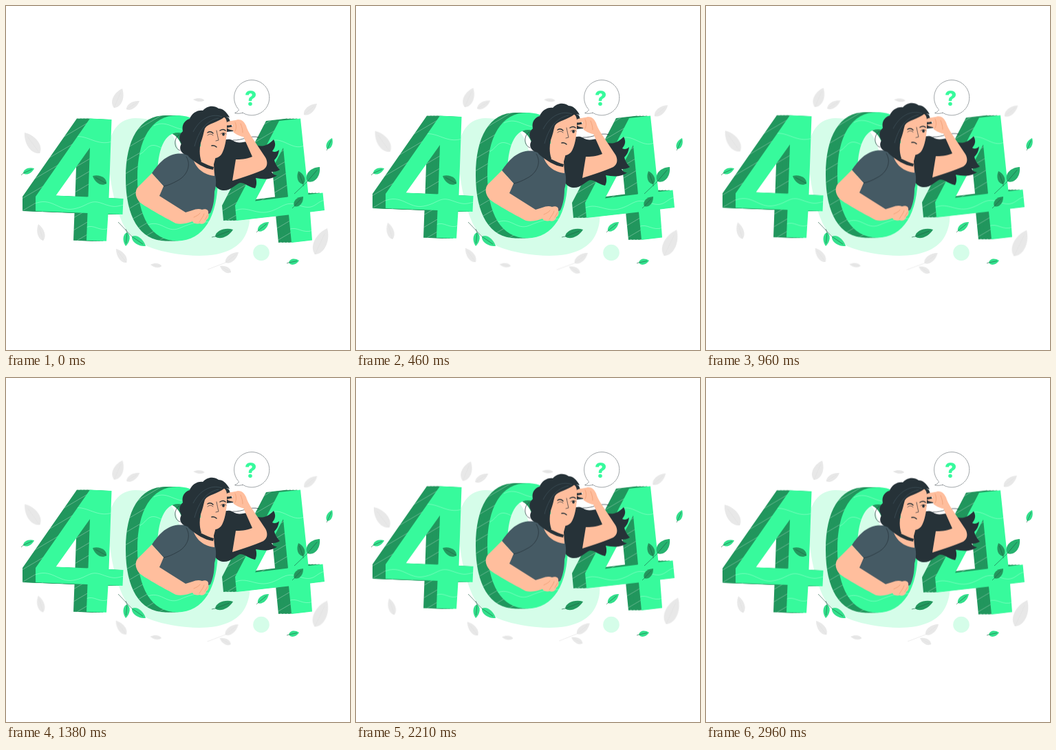
These frames come from a looping animation (500 by 500 pixels, 3 s). An HTML page:

```html
<!DOCTYPE html>
<html lang="en">
<head>
<meta charset="utf-8">
<title>404</title>
<style>
html, body { margin: 0; width: 100%; height: 100%; overflow: hidden; background: #fff; }
svg { display: block; width: 100vw; height: 100vh; }
.float { animation: float 1.5s linear infinite; }
.wind { animation: wind 3s linear infinite; transform-origin: 250px 250px; }
@keyframes float { 50% { transform: translateY(-6.6px); } }
@keyframes wind { 25% { transform: rotate(1deg); } 75% { transform: rotate(-1deg); } }
.face { fill: #37fa9c; }
.side { fill: #21965d; }
.wave { fill: none; stroke: #fff; stroke-width: .6; opacity: .5; }
.skin { fill: #ffbe9d; }
.hair { fill: #263238; }
.shirt { fill: #455a64; }
.ink { fill: none; stroke: #263238; stroke-width: .7; stroke-linecap: round; stroke-linejoin: round; }
.fold { fill: none; stroke: #eb996e; stroke-width: .7; stroke-linecap: round; }
.bubble { fill: #fff; stroke: #263238; stroke-width: .6; stroke-dasharray: 1.5 .5; }
text { font: 800 30px Inter, Arial, sans-serif; fill: #37fa9c; text-anchor: middle; }
</style>
</head>
<body>
<svg viewBox="0 0 500 500">
  <defs>
    <path id="four1" fill-rule="evenodd" clip-rule="evenodd" d="M122 163.500L153.500 165L149.500 279L170.500 280L169.500 303L148.500 302.300L146 341.700L117 340.700L118.500 301L43 298L43 277ZM122 206L72.500 275.500L119.500 277.500Z"/>
    <path id="zero" fill-rule="evenodd" clip-rule="evenodd" d="M249 159C287 159 308 194 308 250S287 341.500 249 341.500S191 306 191 250S211 159 249 159ZM250 184C231 184 220 207 220 250S231 311 250 311S279 293 279 250S269 184 250 184Z"/>
    <path id="four2" fill-rule="evenodd" clip-rule="evenodd" d="M397 167L428 163.500L439.500 274L460.500 271.500L463 297L442 299.500L445 340.500L415 344L411 303.500L335 312L333 290ZM403 206L362 283.500L410 277.500Z"/>
    <clipPath id="c-four1"><use href="#four1"/></clipPath>
    <clipPath id="c-zero"><use href="#zero"/></clipPath>
    <clipPath id="c-four2"><use href="#four2"/></clipPath>
  </defs>

  <g class="wind" id="grey"></g>

  <path fill="#d5fde9" d="M149 216C148 184 164 163 188 163C222 163 241 178 249 203C260 244 296 240 328 262C355 279 360 307 349 331C337 358 303 366 262 362C222 358 185 348 169 315C156 285 150 250 149 216Z"/>
  <circle cx="371" cy="358.500" r="11.800" fill="#d5fde9"/>

  <g class="float">
    <g id="digits"></g>

    <!-- hair behind the arms -->
    <path class="hair" d="M303 192C315 198 321 191 329 195C341 203 347 194 358 198C366 206 378 206 389 194C393 201 391 206 387 211C390 213 394 212 397 209C396 217 393 221 390 224C392 231 395 235 398 238C393 241 389 241 386 241C388 245 391 246 394 246C385 253 374 252 363 250C365 256 364 262 362 265C354 264 348 257 340 257C332 260 327 269 315 268C308 267 303 262 302 255L292 220Z"/>
    <path class="ink" d="M330 195C344 196 354 187 368 191M252 187C244 191 243 207 253 210"/>

    <!-- raised arm -->
    <path class="skin" d="M330 183C336 188 341 189 345 190L358 219C349 223 340 223 334 223L329 254C346 249 362 243 374 238C380 234 381 227 377 220L355 187L349 178Z"/>

    <!-- body -->
    <path class="shirt" d="M212 243C222 229 231 217 250 214.500C262 214 270 216 277 221C285 230 292 235 301 236C305 246 307 258 303 270C303 284 300 295 297 301C282 308 264 310 253 304C238 302 225 290 221 276L229 262Z"/>
    <path class="ink" d="M262 219C270 231 263 247 249 254C242 258 235 261 229 262C226 267 223 271 223 275"/>

    <!-- lower arm -->
    <path class="skin" d="M212 243L191 264C187 270 188 278 194 285C204 293 232 308 247 316C257 318 265 315 271 313C273 317 279 317 281 316C287 318 290 315 291 311C295 309 295 304 294 301C295 296 290 294 285 296C277 293 270 298 261 300L223 276L229 262Z"/>
    <path class="fold" d="M273 307C277 305 280 304 282 301M281 314C284 309 287 306 288 302M289 311L293 304"/>

    <!-- neck and choker -->
    <path class="skin" d="M282 204L271 217C273 232 284 245 303 247L302 230L306 215Z"/>
    <path class="hair" d="M268 216C279 224 290 231 302 234L301 238C288 236 277 229 268 221Z"/>

    <!-- head -->
    <path class="hair" d="M314 158L324 163L331 182L320 183Z"/>
    <path class="skin" d="M316 161C322 164 321 170 321 179C321 189 319 203 315 212C311 222 302 223 292 219C285 217 282 208 283 196L286 174Z"/>
    <path class="hair" d="M325 162C320 153 315 149 309 149C301 143 291 146 286 152C278 151 270 156 267 164C259 166 255 174 257 182C251 187 251 194 255 200C250 209 256 215 264 217C270 225 278 226 284 226C281 217 281 208 283 199C286 191 287 185 289 178C294 170 307 170 318 161Z"/>
    <path fill="none" stroke="#455a64" stroke-width=".6" d="M314 161C298 155 281 165 272 183M309 163C292 166 280 181 274 204"/>
    <path class="ink" d="M306 181C307 186 308 191 309 195L305 196M293 188C295 186 298 185 301 188"/>
    <path class="ink" style="stroke-width:1.500" d="M293 184C296 182 299 183 301 185M311 181C314 179 317 179 319 181M299 203C302 202 304 203 306 205"/>
    <ellipse class="hair" cx="316" cy="186.500" rx="1.800" ry="2.300"/>
    <path class="ink" d="M312 186C314 184 318 184 320 186"/>

    <!-- hand on the forehead -->
    <path class="skin" d="M321 169C325 166 333 167 337 165C343 165 346 168 349 174C351 181 354 184 355 188L344 190C338 188 331 185 330 181C326 180 322 179 321 177L329 175.500L329 172.500C325 173.500 322 174 320 173Z"/>
    <path class="fold" d="M333 169C335 173 335 178 333 182M341 171C343 176 344 179 344 184"/>
  </g>

  <g id="green"></g>

  <circle class="bubble" cx="357.200" cy="133.200" r="25.600"/>
  <path fill="#fff" d="M339 150L332.500 155.500L345 154Z"/>
  <path class="bubble" d="M338.500 151C337 153 335 155 332.500 155.500C337 157 341 156 345 155"/>
  <text x="355.800" y="144.500">?</text>
</svg>
<script>
const byId = id => document.getElementById(id);

// Pointed leaf from stem (x1, y1) to tip (x2, y2), with a midrib and an optional stalk end.
function leaf([x1, y1, x2, y2, w, color, sx = x1, sy = y1], rib) {
  const dx = x2 - x1, dy = y2 - y1, len = Math.hypot(dx, dy);
  const at = (t, side) => {
    const k = side * w * .68 / len;
    return `${(x1 + dx * t - dy * k).toFixed(1)} ${(y1 + dy * t + dx * k).toFixed(1)}`;
  };
  return `<path fill="${color}" d="M${x1} ${y1}C${at(.15, 1)} ${at(.65, 1)} ${x2} ${y2}C${at(.65, -1)} ${at(.15, -1)} ${x1} ${y1}"/>
    <path fill="none" stroke="${rib}" stroke-width=".6" d="M${sx} ${sy}L${x1} ${y1}L${at(.8, 0)}"/>`;
}

const pale = '#e8e8e8', bright = '#33e08c', mid = '#27b26f', deep = '#23985e';
byId('grey').innerHTML = [
  [157, 148, 169, 120, 14, pale], [175, 150, 194, 138, 9, pale],
  [288, 137, 272, 136, 5, pale], [433, 158, 452, 142, 10, pale],
  [49, 214, 27, 184, 16, pale], [54, 341, 47, 317, 10, pale],
  [175, 373, 160, 353, 10, pale], [226, 378, 210, 376, 6, pale],
  [319, 373, 338, 358, 10, pale, 293, 383], [327, 387, 311, 378, 8, pale],
  [449, 361, 467, 323, 18, pale]
].map(l => leaf(l, '#e0e0e0')).join('');

byId('green').innerHTML = [
  [25, 243, 41, 236, 8, bright, 22, 246], [146, 258, 126, 247, 11, deep],
  [304, 335, 330, 325, 11, deep, 299, 336], [176, 329, 174, 349, 9, bright, 174, 324],
  [183, 335, 203, 349, 10, bright, 163, 314], [366, 327, 382, 314, 9, bright, 364, 329],
  [411, 373, 426, 370, 8, bright, 408, 374], [467, 208, 474, 192, 8, bright, 466, 210],
  [432, 259, 425, 240, 10, deep, 432, 262], [438, 255, 456, 234, 15, mid, 419, 273],
  [419, 291, 432, 277, 10, deep, 416, 294]
].map(l => leaf(l, '#1d5f44')).join('');

// Parallel slanted lines across the extruded sides.
const hatch = x0 => Array.from({ length: 16 }, (_, i) =>
  `M${x0 - 10} ${160 + i * 18}l170 -100`).join('');

function digit(id, depth, x0, waves) {
  const sides = [1, .75, .5, .25].map(k =>
    `<use class="side" href="#${id}" x="${-depth * k}"/>`).join('');
  return `${sides}
    <g transform="translate(${-depth})"><g clip-path="url(#c-${id})">
      <path class="wave" d="${hatch(x0)}"/></g></g>
    <use class="face" href="#${id}"/>
    <g clip-path="url(#c-${id})"><path class="wave" d="${waves}"/></g>`;
}

byId('digits').innerHTML =
  digit('four1', 19, 42, 'M100 190C119 187 132 204 154 197M40 288C66 276 76 299 98 295S121 280 140 287S160 291 172 289M116 322C128 316 136 329 149 323') +
  digit('zero', 17, 190, 'M188 217C206 216 203 193 227 207M215 174C237 163 248 187 272 177M188 282C204 276 206 301 224 299M204 319C225 309 233 331 252 323S279 313 304 314') +
  digit('four2', 19, 333, 'M383 197C402 188 415 211 433 203M330 299C349 288 362 304 382 299S405 282 427 290S450 284 464 282M411 325C423 319 431 332 446 326');
</script>
</body>
</html>
```
